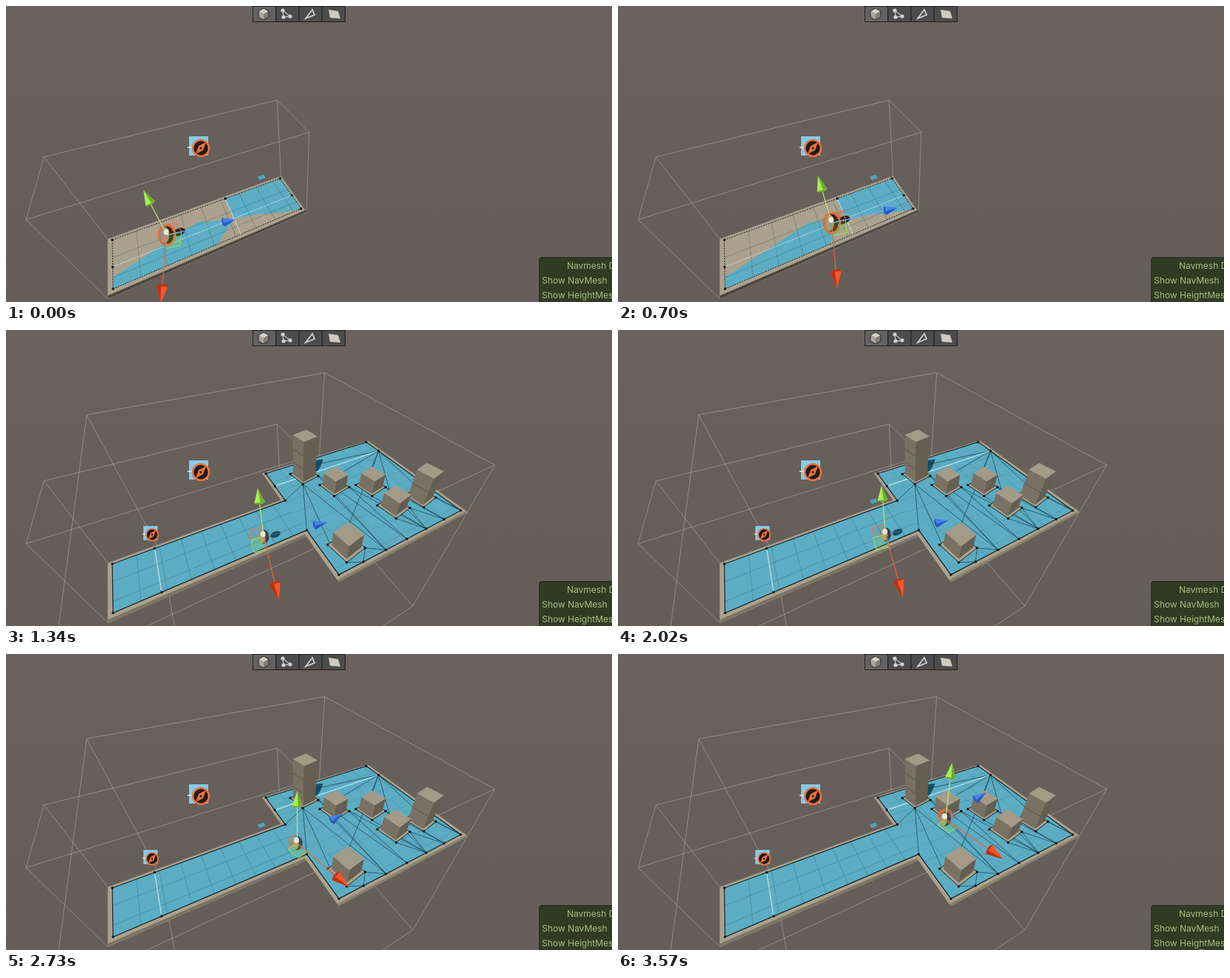
An HTML page with a canvas that plays this animation: 821x402 px, repeating every 3640 ms.

```html
<!DOCTYPE html>
<html>
<head>
<meta charset="utf-8">
<style>
html, body { margin: 0; width: 100%; height: 100%; overflow: hidden; background: #675f5a; }
canvas { display: block; }
</style>
</head>
<body>
<canvas id="stage" width="821" height="402"></canvas>
<script>
const ctx = document.getElementById('stage').getContext('2d');
const LOOP = 3640, STEP = 70;
const TILE_AT = 1130, VOLUME_AT = 1200;
const BLUE = '#5cadc3', TAN = '#aba18e', INK = '#15272c';
const PALE = 'rgba(225,244,247,.75)', WIRE = 'rgba(178,176,172,.55)';

// Camera: the room floor is the unit square, each axis has its vanishing point.
const ORIGIN = [352, 195];
const AXES = [[.1801, 1243, -86], [-.29, 394, 646], [-.3163, 138, -102]];

const depth = (x, y, z) => 1 + AXES[0][0] * x + AXES[1][0] * y + AXES[2][0] * z;
function project([x, z, y = 0]) {
  const world = [x, y, z], w = depth(x, y, z);
  return [0, 1].map(i =>
    AXES.reduce((sum, axis, n) => sum + world[n] * axis[0] * axis[i + 1], ORIGIN[i]) / w);
}
const mix = (a, b, k) => a.map((v, i) => v + (b[i] - v) * k);
const rect = (x0, x1, z0, z1, y) => [[x0, z0, y], [x1, z0, y], [x1, z1, y], [x0, z1, y]];

// Flat drawing takes screen points, the 3D helpers project first.
function trace(pts, closed) {
  ctx.beginPath();
  pts.forEach(p => ctx.lineTo(...p));
  if (closed) ctx.closePath();
}
function fill(color, pts) {
  trace(pts, true);
  ctx.fillStyle = color;
  ctx.fill();
}
function line(color, width, pts, closed) {
  trace(pts, closed);
  ctx.strokeStyle = color;
  ctx.lineWidth = width;
  ctx.stroke();
}
const face = (color, pts) => fill(color, pts.map(project));
const edge = (color, width, pts, closed) => line(color, width, pts.map(project), closed);
function oval(x, y, rx, ry, color, tilt = 0) {
  ctx.beginPath();
  ctx.ellipse(x, y, rx, ry, tilt, 0, 7);
  ctx.fillStyle = color;
  ctx.fill();
}
function ring(x, y, rx, ry, color, from = 0, to = 7) {
  ctx.beginPath();
  ctx.ellipse(x, y, rx, ry, 0, from, to);
  ctx.strokeStyle = color;
  ctx.lineWidth = 2.6;
  ctx.stroke();
}
function dots(pts) {
  ctx.fillStyle = '#101719';
  pts.map(project).forEach(([x, y]) => ctx.fillRect(x - 1.5, y - 1.5, 3, 3));
}
function grid(x0, x1, z0, z1, alpha) {
  const color = `rgba(45,75,82,${alpha})`, cell = .12;
  for (let x = x0 + cell; x < x1 - .02; x += cell) edge(color, 1.2, [[x, z0], [x, z1]]);
  for (let z = z0 + cell; z < z1 - .02; z += cell) edge(color, 1.2, [[x0, z], [x1, z]]);
}
function wireBox(x0, x1, z0, z1, y0, y1) {
  const top = rect(x0, x1, z0, z1, y1), base = rect(x0, x1, z0, z1, y0);
  edge(WIRE, 1, top, true);
  edge(WIRE, 1, base, true);
  top.forEach((p, i) => edge(WIRE, 1, [p, base[i]]));
}

function background() {
  const g = ctx.createLinearGradient(0, 0, 0, 402);
  g.addColorStop(0, '#6a625e');
  g.addColorStop(.3, '#68605b');
  g.addColorStop(1, '#655e58');
  ctx.fillStyle = g;
  ctx.fillRect(0, 0, 821, 402);
}

const HALL = [-1.054, 0, .347, .65];
const ROOM_FLOOR = [[-1.054, .347], [0, .347], [0, 0], [1, 0], [1, 1], [0, 1], [0, .65], [-1.054, .65]];

function hall(joined) {
  face(joined ? '#7d7465' : '#4d473f', [[-1.075, .67], [-.02, .67], [-.02, .69], [-1.075, .69]]);
  face(TAN, rect(-1.075, -.025, .33, .673));
  face('#55a0b3', rect(-.17, -.125, .255, .295));
  if (joined) return;
  const [x0, , z0, z1] = HALL, x1 = -.04, xm = -.425, zm = .525;
  face(BLUE, [[x0, .585], [-.62, .45], [xm, .53], [-.56, z1], [x0, z1]]);
  face(BLUE, [[xm, z0], [x1, z0], [x1, z1], [-.16, z1 - .03], [-.3, .56], [xm, zm]]);
  grid(...HALL, .25);
  ctx.setLineDash([2, 1.5]);
  edge('#171b1b', 1, rect(x0, x1, z0, z1), true);
  edge('rgba(235,245,245,.85)', 1, [[x0, zm], [x1, zm]]);
  ctx.setLineDash([]);
  edge(PALE, 1, [[xm, z0], [xm, z1]]);
  dots([...rect(x0, x1, z0, z1), [x0, zm], [x1, zm], [xm, z0]]);
}

// obstacles on the floor: x, z, number of stacked cubes
const BLOCKS = [[.256, .159, 3], [.389, .382, 1], [.627, .51, 1], [.865, .768, 2], [.624, .754, 1], [.144, .868, 1]];

// left, back, right and front corner of a slightly turned square
function corners(x, z, size, y) {
  const c = Math.cos(.18) * size / 2, s = Math.sin(.18) * size / 2;
  return [[-1, -1], [1, -1], [1, 1], [-1, 1]].map(([u, v]) => [x + u * c + v * s, z - u * s + v * c, y]);
}
function block([x, z, count]) {
  const pad = corners(x, z, .155), high = count * .122;
  face(TAN, pad);
  edge(INK, 1, pad, true);
  dots(pad);
  const [left, , right, front] = corners(x, z, .122, 0);
  const top = corners(x, z, .122, high);
  face('#797163', [left, front, top[3], top[0]]);
  face('#655e52', [front, right, top[2], top[3]]);
  face('#a39a87', top);
  for (let i = 1; i < count; i++) {
    edge('rgba(55,50,44,.45)', 1, corners(x, z, .122, i * .122).filter((p, n) => n !== 1).sort((a, b) => a[0] - b[0] || 0).slice(0, 2));
  }
}

function mesh() {
  const color = 'rgba(18,55,68,.65)', hub = corners(...BLOCKS[0], 0).length && corners(BLOCKS[0][0], BLOCKS[0][1], .155)[3];
  [[0, .347], [0, .65], [.06, .85]].forEach(p => edge(color, 1, [hub, p]));
  for (const [x, z] of BLOCKS) {
    const [, back, right, front] = corners(x, z, .155);
    const near = k => [Math.min(1, Math.round((x + k) * 6) / 6), 1];
    edge(color, 1, [front, near(0)]);
    edge(color, 1, [right, near(.08)]);
    edge(color, 1, [right, near(.22)]);
    edge(color, 1, [back, [1, .17]]);
  }
}

function room() {
  face('#8a806f', [[-.025, .66], [-.025, 1.035], [1.03, 1.035], [1.03, 1.0], [.1, .9]]);
  face(TAN, rect(-.025, 1.03, -.015, 1.02));
  face(BLUE, ROOM_FLOOR);
  grid(...HALL, .24);
  grid(0, 1, 0, 1, .1);
  face('#174e63', [[.31, .1], [.44, .03], [.5, .05], [.42, .13], [.33, .2]]);
  mesh();
  edge(PALE, 1.2, [[-.84, .347], [-.84, .65]]);
  edge(PALE, 1.2, [[0, .17], [1, .17]]);
  edge(INK, 1.2, ROOM_FLOOR, true);
  dots([...ROOM_FLOOR, [-.84, .347], [-.84, .65], [0, .17], [1, .17]]);
  for (let i = 1; i < 6; i++) dots([[i / 6, 1]]);
  BLOCKS.forEach(block);
}

function surfaceIcon(x, y, s) {
  ctx.save();
  ctx.translate(x, y);
  ctx.scale(s, s);
  ctx.fillStyle = '#86cbe9';
  ctx.fillRect(-16, -16, 26, 26);
  line('#e8f2f5', 1.5, [[-18, -1], [-10, -1]]);
  oval(0, 0, 11, 11, '#1d1c1c');
  ring(0, 0, 11, 11, '#f0703a');
  fill('#f0703a', [[7, -8], [3, 3], [-7, 8], [-3, -3]]);
  oval(0, 0, 1.6, 1.6, '#1d1c1c');
  ctx.restore();
}

// Two straight walks at one speed: brake to a stop, rest, speed up, turning on the way.
const SPEED = .00041, STOP = 1630, BRAKE = 300, GO = 2020, SPEED_UP = 490;
const HEADINGS = [.21, -.23];

function walk(t) {
  const left = Math.max(0, STOP - t), gone = Math.max(0, t - GO);
  const first = SPEED * (STOP - BRAKE / 2 - (left > BRAKE ? left - BRAKE / 2 : left * left / (2 * BRAKE)));
  const second = SPEED * (gone > SPEED_UP ? gone - SPEED_UP / 2 : gone * gone / (2 * SPEED_UP));
  const [a, b] = HEADINGS;
  return {
    x: -.788 + first * Math.cos(a) + second * Math.cos(b),
    z: .457 + first * Math.sin(a) + second * Math.sin(b),
    turn: a + (b - a) * Math.min(1, gone / SPEED_UP)
  };
}

function cone(from, tip, len, half, light, dark, shaft) {
  const dx = tip[0] - from[0], dy = tip[1] - from[1], d = Math.hypot(dx, dy);
  const ux = dx / d, uy = dy / d, bx = tip[0] - ux * len, by = tip[1] - uy * len;
  const side = k => [bx - uy * half * k, by + ux * half * k];
  line(shaft, 1.2, [from, [bx, by]]);
  oval(bx, by, half * .35, half, dark, Math.atan2(uy, ux));
  fill(light, [side(1), tip, side(-1)]);
  fill(dark, [side(1), tip, side(.2)]);
}

function agent(t) {
  const { x, z, turn } = walk(t);
  const reach = .53 * depth(x, 0, z), c = Math.cos(turn) * reach, s = Math.sin(turn) * reach;
  const p = project([x, z]), [px, py] = p;
  const green = project([x, z, reach]), red = project([x - s, z + c]), blue = project([x + c, z + s]);
  const early = t < TILE_AT, flip = early ? .21 : -.2, size = early ? 1 : .8;

  if (t < GO + SPEED_UP) oval(px + 16, py - 4 * size, 9 * size, 5 * size, early ? '#211e1c' : '#1e4c60', -.4);
  oval(px, py, 9 * size, 12 * size, early ? '#24211e' : '#3b3a35');
  oval(px - 3 * size, py, 6 * size, 11 * size, '#a79a7b');
  if (early) ring(px, py, 11, 13.5, '#f0662c');
  else if (t > 3150) ring(px, py - 4, 9, 9, '#f0662c', 2.9, 6.5);

  const plane = (a, ka, b, kb, color, tint) => {
    const q = mix(p, a, ka), r = mix(p, b, kb);
    const quad = [p, q, [q[0] + r[0] - px, q[1] + r[1] - py], r];
    fill(tint, quad);
    line(color, 1, quad, true);
  };
  plane(red, .2, green, .2, 'rgba(80,150,235,.5)', 'rgba(70,130,230,.1)');
  plane(green, .2, blue, flip, '#e07848', 'rgba(235,90,40,.1)');
  plane(red, .2, blue, flip, '#a3e45a', 'rgba(150,230,70,.2)');

  cone(p, blue, 17, 6, '#4482ea', '#2957b9', early ? '#6aa9f2' : 'rgba(90,150,235,.25)');
  cone(p, red, 23, 7.5, '#ff5427', '#b93113', '#ee6236');
  cone(p, green, 20, 7, '#a5ee50', '#6eaa33', '#b3e67c');
  oval(px - 1, py - 4, 3.5, 4, '#ece6d2');
}

function toolbar() {
  ctx.fillStyle = '#232323';
  ctx.fillRect(334, 0, 126, 22);
  for (let i = 0; i < 4; i++) {
    ctx.fillStyle = i ? '#4c4c4c' : '#626262';
    ctx.fillRect(335 + i * 31.3, 1, 30, 20);
  }
  const hex = [...Array(6)].map((_, i) => [349 + 8 * Math.sin(i * Math.PI / 3), 11 - 8 * Math.cos(i * Math.PI / 3)]);
  const hub = [349, 11];
  fill('#d3cfc6', [hex[5], hex[0], hex[1], hub]);
  fill('#aaa69d', [hex[5], hub, hex[3], hex[4]]);
  fill('#827e77', [hub, hex[1], hex[2], hex[3]]);
  line('#2c2c2c', 1, hex, true);
  const nodes = [[375, 6], [376, 15], [385, 14]];
  line('#c9c9c9', 1.2, nodes, true);
  nodes.forEach(([x, y]) => oval(x, y, 2.6, 2.6, '#d0d0d0'));
  line('#cfcfcf', 1.8, [[406, 17], [415, 5], [418, 12]], true);
  fill('#cfcabf', [[437, 5], [450, 7], [453, 17], [439, 16]]);
}

function panel(t) {
  ctx.beginPath();
  ctx.roundRect(722.5, 341.5, 110, 80, 3);
  ctx.fillStyle = '#313b24';
  ctx.fill();
  ctx.strokeStyle = '#222a1a';
  ctx.lineWidth = 1;
  ctx.stroke();
  ctx.font = '12px Inter, sans-serif';
  ctx.fillStyle = '#a5bf7c';
  ctx.fillText('Navmesh Display', 760, 357);
  ctx.fillText('Show NavMesh', 726, 377);
  ctx.fillText('Show HeightMesh', 726, 397);
  if (t >= 3500) oval(791, 407, 8, 6, '#8b9480');
}

function draw(now) {
  const t = Math.floor(now % LOOP / STEP) * STEP;
  const joined = t >= TILE_AT, volume = t >= VOLUME_AT;
  background();
  wireBox(-1.075, -.025, .33, .69, 0, .613);
  if (volume) wireBox(-1.06, 1.03, -.81, 1.03, -1.4, .407);
  hall(joined);
  if (joined) room();
  if (volume) surfaceIcon(198, 278, .74);
  surfaceIcon(264, 193, 1);
  agent(t);
  toolbar();
  panel(t);
}

const start = performance.now();
function tick() {
  draw(performance.now() - start);
  requestAnimationFrame(tick);
}
tick();
</script>
</body>
</html>
```
